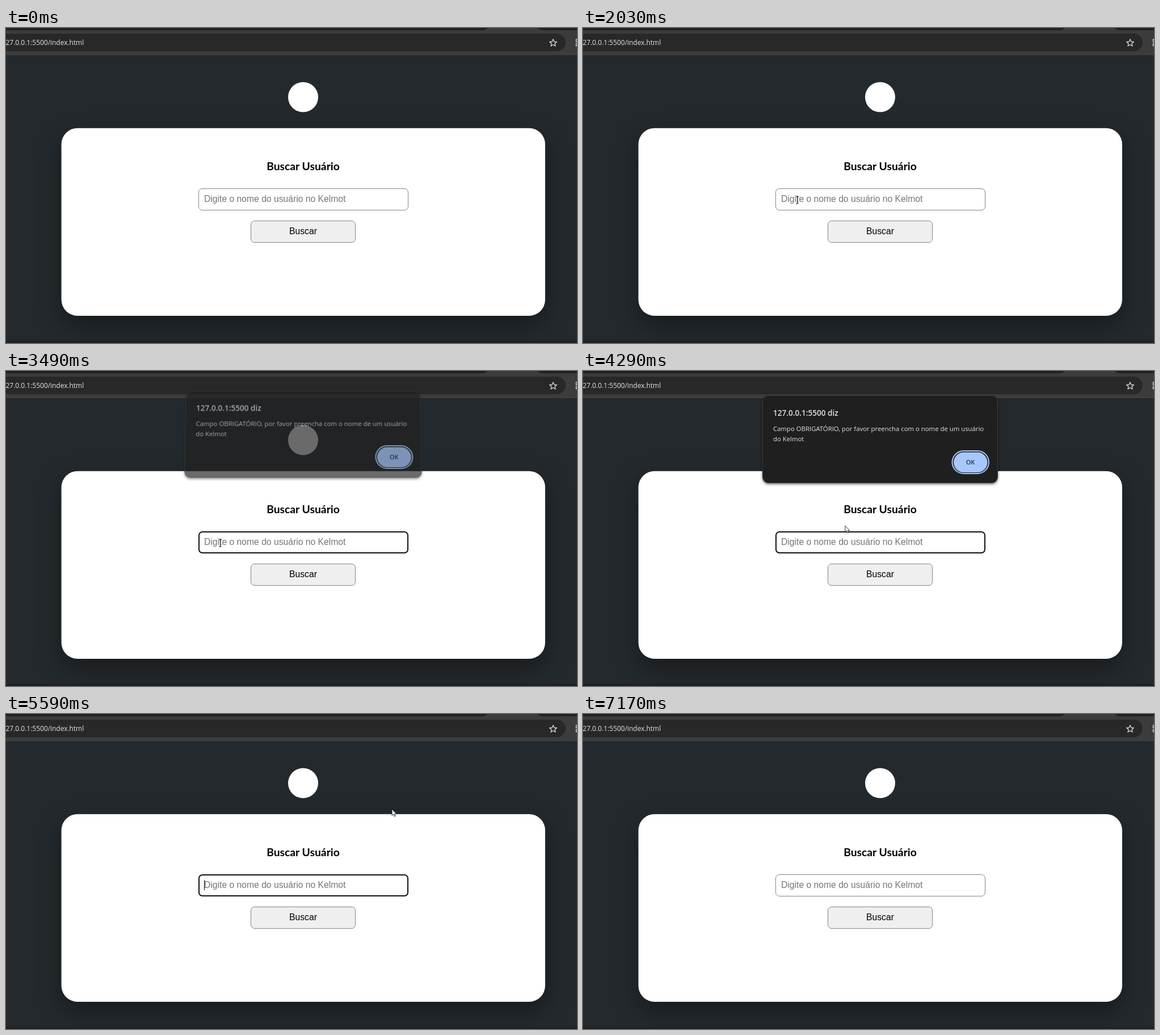
Write an HTML page that moves like this. It is 1006 px wide and 556 px high and loops after 7.23 s.

```html
<!DOCTYPE html>
<html lang="pt-BR">
<head>
<meta charset="utf-8">
<title>Buscar Usuário</title>
<style>
  html, body { margin: 0; width: 100%; height: 100%; overflow: hidden; background: #24292d; }
  #stage { position: absolute; inset: 0; overflow: hidden; }
  #stage div, svg { position: absolute; box-sizing: border-box; }
  .full { left: 0; top: 0; width: 1006px; height: 556px; }
  .shadow {
    left: 98px; top: 177px; width: 852px; height: 331px;
    border-radius: 29px; box-shadow: 0 16px 42px rgba(0, 0, 0, .34);
  }
  #field, .button { border: 1px solid #858585; border-radius: 7px; }
  #field { left: 339px; top: 283px; width: 370px; height: 39px; }
  #field.focus { border: 2px solid #101010; }
  .button { left: 431px; top: 340px; width: 185px; height: 39px; background: #efefef; }
  .form { font-family: "Liberation Sans", Arial, sans-serif; font-size: 15.7px; }
  .ui { font-family: "Open Sans", "Noto Sans", sans-serif; fill: #e3e3e3; }
  .head { font: 700 19.3px Lato, sans-serif; }
  #dialog {
    left: 316px; top: 43px; width: 415px; height: 155px;
    border: 1px solid #3b3c3e; border-radius: 11px;
    background: #1f1f1f; box-shadow: 0 2px 4px rgba(0, 0, 0, .55);
  }
  #dialog svg { left: 0; top: 0; width: 413px; height: 153px; }
</style>
</head>
<body>
<div id="stage">
  <div class="shadow"></div>

  <svg class="full" viewBox="0 0 1006 556">
    <!-- browser bar -->
    <rect width="1006" height="47" fill="#3c3c3c"/>
    <path d="M0 0H848Q846 4 838 4H0zM937 0H1006V4H947Q939 4 937 0z" fill="#202123"/>
    <rect x="-40" y="10" width="1026" height="31" rx="15.5" fill="#282828"/>
    <rect y="46.5" width="1006" height="1" fill="#4b4c4d"/>
    <text class="ui" x="-.5" y="30" font-size="11.95">27.0.0.1:5500/index.html</text>
    <path d="M964 19.8l1.8 4.2 4.6.4-3.5 3 1.1 4.5-4-2.4-4 2.4 1.1-4.5-3.5-3 4.6-.4z"
          fill="none" stroke="#d0d0d0" stroke-width="1.4" stroke-linejoin="round"/>
    <path d="M1007 20h-2.5v4.5h2.5M1007 27.5h-2.5v4h2.5" fill="none" stroke="#c7c7c7" stroke-width="1.5"/>
    <rect y="552" width="1006" height="4" fill="#1e2225"/>

    <circle cx="523.5" cy="122" r="26.5" fill="#fff"/>
    <rect x="97.6" y="176.7" width="852.3" height="331.3" rx="28.5" fill="#fff"/>
    <text class="head" x="523.5" y="251" text-anchor="middle">Buscar Usuário</text>
  </svg>

  <div id="field"></div>
  <div class="button"></div>
  <svg class="full form" viewBox="0 0 1006 556">
    <text x="349" y="307" fill="#757575">Digite o nome do usuário no Kelmot</text>
    <rect id="caret" x="349" y="293" width="1" height="18" fill="#1a0d08"/>
    <text x="523.5" y="364" text-anchor="middle">Buscar</text>
  </svg>

  <div id="dialog">
    <svg class="ui" viewBox="317 44 413 153">
      <text x="335" y="79" font-size="13.6" font-weight="600">127.0.0.1:5500 diz</text>
      <g font-size="11.35">
        <text x="335" y="106">Campo OBRIGATÓRIO, por favor preencha com o nome de um usuário</text>
        <text x="335" y="124">do Kelmot</text>
      </g>
      <rect x="650.5" y="141" width="64.5" height="40" rx="20" fill="none" stroke="#a8c7fa" stroke-width="2"/>
      <rect id="ok" x="653" y="143.5" width="59.5" height="35.5" rx="17.7"/>
      <text x="682.5" y="165" font-size="11" font-weight="600" text-anchor="middle" fill="#17386b">OK</text>
    </svg>
  </div>

  <svg class="full" viewBox="0 0 1006 556">
    <path id="arrow" d="M.5 .5V11.7L3 9.4 4.8 13.3 6.6 12.5 4.9 8.7H8.4z"
          fill="#fff" stroke="#111" stroke-width=".9" stroke-linejoin="round"/>
    <path id="beam" d="M-2.5-6.5H-1Q0-6.5 0-5.5V5.5Q0 6.5-1 6.5H-2.5M2.5-6.5H1Q0-6.5 0-5.5M2.5 6.5H1Q0 6.5 0 5.5"
          fill="none" stroke="#222" stroke-width="1.1"/>
  </svg>
</div>

<script>
const LOOP = 7230, STEP = 70, BLINK = 530;
const APPEAR = 790, FOCUS = 2490, OPEN = 3420, HOVER = 4980, CLOSE = 5380, REFOCUS = 5500, BLUR = 7165;

const [field, caret, dialog, ok, arrow, beam] =
  ["field", "caret", "dialog", "ok", "arrow", "beam"].map(id => document.getElementById(id));

// pointer moves: eased curves through a control point
const start = [462, 516], entry = [386, 310], rest = [377.5, 303.5], press = [679.5, 167.5], exit = [938, 560];
const moves = [
  { begin: 1050, end: 1820, from: start, via: [491, 342], to: entry },
  { begin: 1820, end: 2030, from: entry, via: entry, to: rest },
  { begin: 4220, end: 4980, from: rest, via: [760, 165], to: press },
  { begin: 5790, end: 6360, from: press, via: [938, 493], to: exit }
];

const clamp = v => Math.min(1, Math.max(0, v));
const easeOut = (p, power) => 1 - (1 - p) ** power;
const stepped = (t, begin) => Math.floor((t - begin) / STEP) * STEP;
const show = (node, on) => { node.style.visibility = on ? "visible" : "hidden"; };

function pointer(t) {
  const { begin, end, from, via, to } = moves.findLast(m => m.begin <= t) || moves[0];
  const e = easeOut(clamp(stepped(t, begin) / (end - begin)), 1.3);
  return from.map((a, i) => (1 - e) ** 2 * a + 2 * e * (1 - e) * via[i] + e * e * to[i]);
}

function drawPointer(t) {
  const overField = t >= 1750 && t < 4290;
  show(arrow, t >= APPEAR && !overField);
  show(beam, overField);
  (overField ? beam : arrow).setAttribute("transform", `translate(${pointer(t)})`);
}

function drawField(t) {
  const focused = t >= FOCUS && t < BLUR;
  const since = t - (t < OPEN ? FOCUS : REFOCUS);
  field.classList.toggle("focus", focused);
  show(caret, focused && since >= 0 && Math.floor(since / BLINK) % 2 === 0);
}

// the dialog swings in over four steps and out the same way
function drawDialog(t) {
  const swing = begin => clamp((stepped(t, begin) / STEP + 1) / 4);
  const p = swing(OPEN) - swing(CLOSE), away = 1 - p;
  show(dialog, p > 0);
  dialog.style.opacity = easeOut(p, 1.6);
  dialog.style.transform = away
    ? `translateY(${-18 * away}px) perspective(1780px) translateZ(${14 * away}px) rotateX(${16 * away}deg)`
    : "none";
  ok.setAttribute("fill", t < HOVER ? "#a8c7fa" : "#a6beea");
}

const origin = performance.now();
function tick() {
  const t = (performance.now() - origin) % LOOP;
  drawPointer(t);
  drawField(t);
  drawDialog(t);
  requestAnimationFrame(tick);
}
tick();
</script>
</body>
</html>
```
